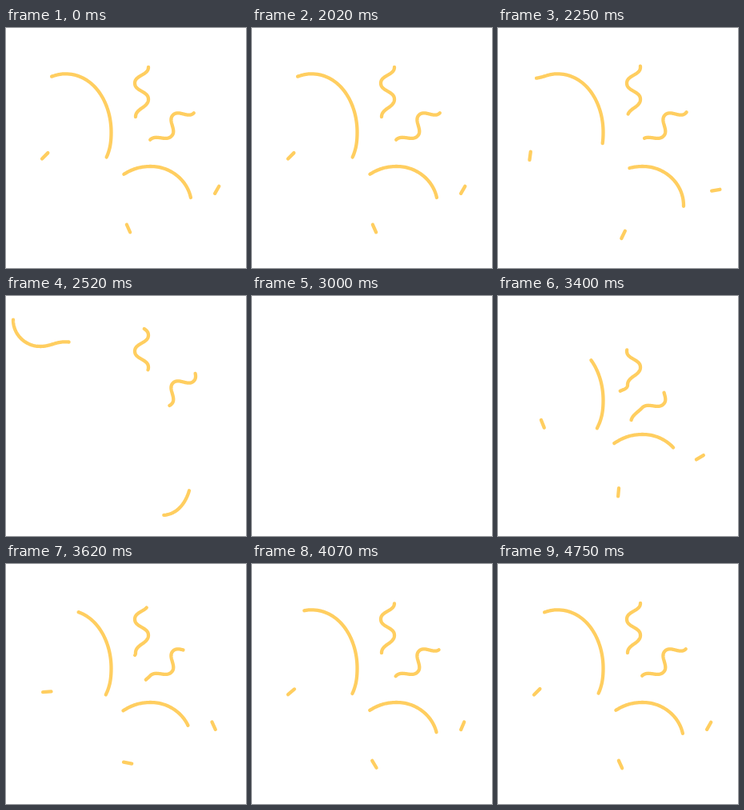
Animation of 300 by 300 pixels, one loop 4.77 s. Source, as an HTML page with a canvas:

```html
<!DOCTYPE html>
<html lang="en">
<head>
<meta charset="utf-8">
<title>Confetti burst</title>
<style>
  html, body { margin: 0; width: 100%; height: 100%; overflow: hidden; background: #fff; }
  canvas { display: block; width: 100vw; height: 100vh; }
</style>
</head>
<body>
<canvas id="stage"></canvas>
<script>
const LOOP = 4770, LEAVE = 2000, ENTER = 3000, SIZE = 300;
const COLOR = '#ffce60', WIDTH = 4.3;
const canvas = document.getElementById('stage');
const ctx = canvas.getContext('2d');

const clamp = v => Math.min(1, Math.max(0, v));
const mix = (a, b, p) => a + (b - a) * p;
const rad = deg => deg * Math.PI / 180;
const easeIn = x => Math.pow(clamp(x), 2.7);
const easeOut = (t, start, half) => t < start ? 0 : 1 - Math.pow(2, (start - t) / half);

// Samples a smooth curve through knots [x, y, heading], with running length.
function trace(knots) {
  const steps = 40, line = [];
  const bezier = (a, b, c, d, s) =>
    a * (1 - s) ** 3 + 3 * b * s * (1 - s) ** 2 + 3 * c * s * s * (1 - s) + d * s ** 3;
  for (let i = 1; i < knots.length; i++) {
    const [x0, y0, h0] = knots[i - 1], [x1, y1, h1] = knots[i];
    const reach = 0.39 * Math.hypot(x1 - x0, y1 - y0);
    for (let k = i > 1 ? 1 : 0; k <= steps; k++) {
      const s = k / steps;
      const x = bezier(x0, x0 + reach * Math.cos(rad(h0)), x1 - reach * Math.cos(rad(h1)), x1, s);
      const y = bezier(y0, y0 - reach * Math.sin(rad(h0)), y1 + reach * Math.sin(rad(h1)), y1, s);
      const prev = line[line.length - 1];
      line.push([x, y, prev ? prev[2] + Math.hypot(x - prev[0], y - prev[1]) : 0]);
    }
  }
  return line;
}

// The resting piece runs from point `tail` to point `head` of the path.
// start and half shape the entrance, out is the length of the exit in ms.
function streamer(knots, tail, head, start, half, out) {
  const line = trace(knots);
  const gap = (p, q) => Math.hypot(p[0] - q[0], p[1] - q[1]);
  const lengthAt = p => line.reduce((a, b) => gap(b, p) < gap(a, p) ? b : a)[2];
  return { line, from: lengthAt(tail), to: lengthAt(head),
    total: line[line.length - 1][2], start, half, out };
}

// A lead-in followed by an even wave that climbs from (x, y), turned clockwise.
function squiggle(lead, x, y, turn, start, half, out) {
  const c = Math.cos(rad(turn)), s = Math.sin(rad(turn));
  const place = (u, v) => [x + u * c - v * s, y + u * s + v * c, 90 - turn];
  const wave = [place(-16, 22)];
  for (let i = 0; i < 5; i++) wave.push(place(i % 2 ? -17 : 0, -20 * i));
  return streamer([...lead, ...wave], wave[0], wave[3], start, half, out);
}

const streamers = [
  streamer([[121, 170.5, 60], [131.5, 130, 90], [74, 57.3, 180], [43, 63, 180],
    [9, 30, 90], [30, 10, 0], [50, 30, -90], [30, 50, -180]],
    [126, 162], [57, 60], 3114, 225, 720),
  streamer([[138, 189, 35], [181, 173, 0], [232, 222, -90], [195, 274, -180],
    [175, 254, -270], [195, 234, -360]],
    [147, 183], [231, 212], 3022, 175, 650),
  squiggle([[136, 172, 90], [158, 146, 90], [147, 125, 90]], 178, 89, 0, 3117, 106, 980),
  squiggle([[128, 186, 0], [170, 174, 90], [166, 159, 90]], 207, 135, 44, 3095, 145, 980)
];

// Dashes: resting centre, travel since birth, resting angle and spin in degrees.
const dashes = [
  { x: 48.7, y: 159.8, dx: -34, dy: 0, angle: -45, spin: -540 },
  { x: 263.7, y: 202.3, dx: 54, dy: 2.5, angle: 120, spin: 720 },
  { x: 153, y: 250.5, dx: 11.5, dy: 25, angle: 66, spin: 720 }
];
const HALF = 5.2;

function pointAt(line, len) {
  let i = 1;
  while (i < line.length - 1 && line[i][2] < len) i++;
  const a = line[i - 1], b = line[i], s = (len - a[2]) / (b[2] - a[2]);
  return [mix(a[0], b[0], s), mix(a[1], b[1], s)];
}

function drawStreamer(item, t) {
  let { from, to, total, line } = item;
  if (t >= ENTER) {
    const p = easeOut(t, item.start, item.half);
    from *= p;
    to *= p;
  } else {
    const p = easeIn((t - LEAVE) / item.out);
    from = mix(from, total, p);
    to = mix(to, total, p);
  }
  if (to - from < 0.2) return;
  ctx.beginPath();
  ctx.moveTo(...pointAt(line, from));
  for (const [x, y, len] of line) if (len > from && len < to) ctx.lineTo(x, y);
  ctx.lineTo(...pointAt(line, to));
  ctx.stroke();
}

function drawDash(d, t) {
  let shift = 0, turn = 0, grow = 1;
  if (t >= ENTER) {
    const p = easeOut(t, 3062, 150);
    if (p === 0) return;
    shift = turn = p - 1;
    grow = clamp(p * 4);
  } else {
    const x = (t - LEAVE) / 520;
    if (x >= 1) return;
    shift = 62 * easeIn(x) / Math.hypot(d.dx, d.dy);
    turn = 0.5 * easeIn(x);
  }
  const a = rad(d.angle + d.spin * turn);
  const x = d.x + d.dx * shift, y = d.y + d.dy * shift;
  const u = Math.cos(a) * HALF * grow, v = Math.sin(a) * HALF * grow;
  ctx.beginPath();
  ctx.moveTo(x - u, y - v);
  ctx.lineTo(x + u, y + v);
  ctx.stroke();
}

function resize() {
  const ratio = window.devicePixelRatio || 1;
  canvas.width = Math.round(innerWidth * ratio);
  canvas.height = Math.round(innerHeight * ratio);
}
addEventListener('resize', resize);
resize();

function draw(now) {
  const t = now % LOOP;
  ctx.setTransform(canvas.width / SIZE, 0, 0, canvas.height / SIZE, 0, 0);
  ctx.fillStyle = '#fff';
  ctx.fillRect(0, 0, SIZE, SIZE);
  ctx.strokeStyle = COLOR;
  ctx.lineWidth = WIDTH;
  ctx.lineCap = ctx.lineJoin = 'round';
  for (const s of streamers) drawStreamer(s, t);
  for (const d of dashes) drawDash(d, t);
}

let origin;
function tick(now) {
  origin ??= now;
  draw(Math.max(0, now - origin));
  requestAnimationFrame(tick);
}
draw(0);
requestAnimationFrame(tick);
</script>
</body>
</html>
```
